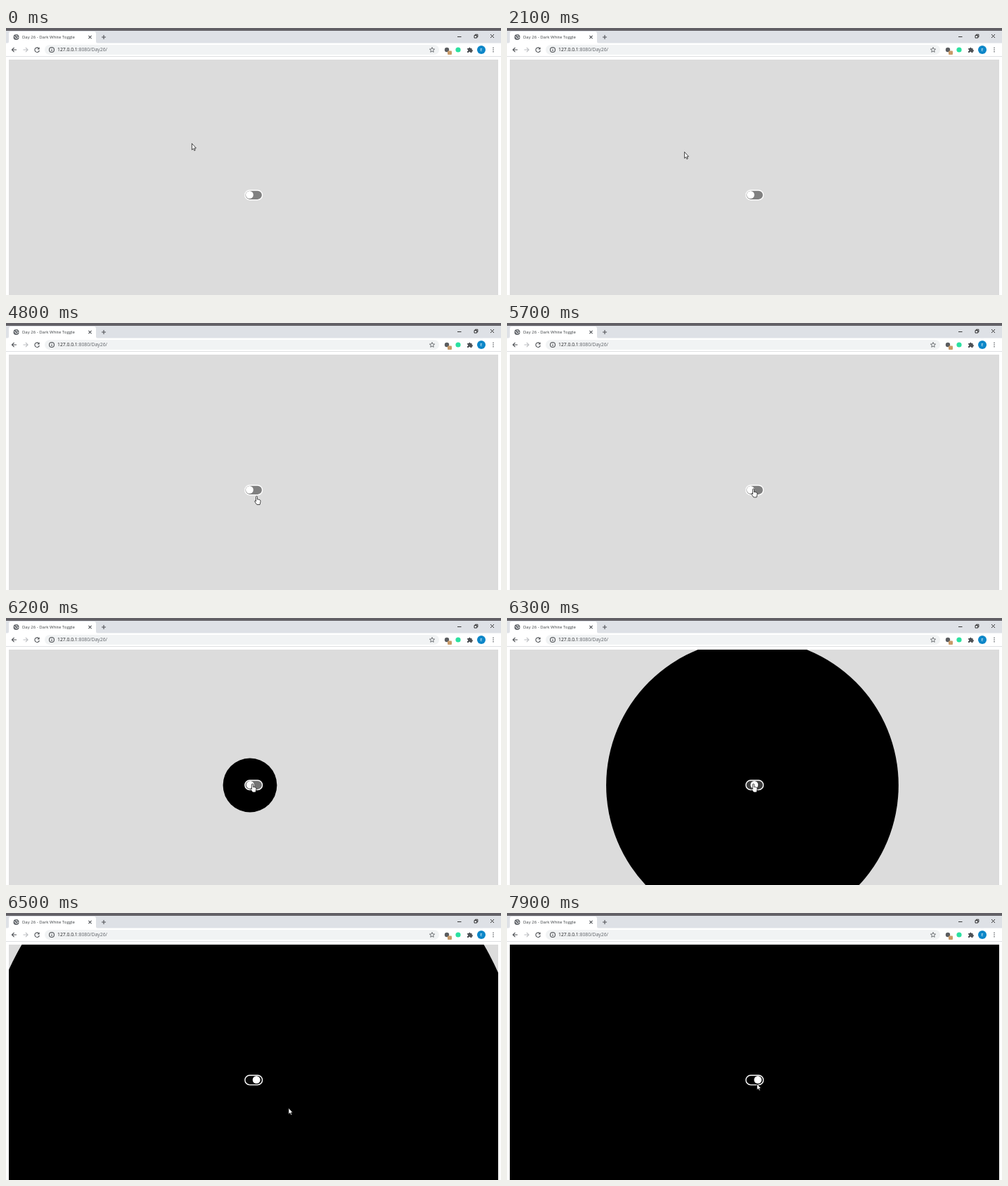
Recreate the animation shown at these times as an HTML page. Size 704 px wide and 380 px high, loop 8000 ms.

```html
<!DOCTYPE html>
<html lang="en">
<head>
<meta charset="utf-8">
<title>Dark mode toggle</title>
<style>
  html, body { margin: 0; width: 100%; height: 100%; overflow: hidden; background: #fff; }
  svg { display: block; width: 704px; height: 380px; font-family: "Open Sans", "Noto Sans", sans-serif; }
  .icon { fill: none; stroke: #505357; stroke-width: 1.1; }
  .thin { stroke-width: .9; stroke: #222; }
</style>
</head>
<body>
<svg viewBox="0 0 704 380">
  <defs><clipPath id="page"><rect x="4" y="45" width="696" height="335"/></clipPath></defs>

  <!-- Tab strip -->
  <rect width="704" height="22" fill="#dee1e6"/>
  <rect width="704" height="4" fill="#626066"/>
  <path d="M1 22Q4 22 4 19V8Q4 5 7 5H125Q128 5 128 8V19Q128 22 131 22Z" fill="#fff"/>
  <circle cx="14.5" cy="13" r="4" fill="#5f6368"/>
  <path d="M11.4 12.2l2 .8.5 2.2M14 9.8l.6 1.5 2.2.4M15.2 15.6l.6-1.8 2-.4" fill="none" stroke="#fff" stroke-width=".9"/>
  <text x="23" y="15.2" font-size="6" fill="#3c4043">Day 26 - Dark White Toggle</text>
  <path class="icon" d="M117.4 10.9l4.2 4.2m0-4.2l-4.2 4.2M136 13h6m-3-3v6"/>
  <path class="icon thin" d="M642 12.5h5.5M666 10.5h3.6v3.6H666ZM667.3 10.5V9.2h3.6v3.6h-1.3M689 9l5 5m0-5l-5 5"/>

  <!-- Toolbar -->
  <rect y="21.5" width="704" height="19" fill="#fff"/>
  <rect y="40" width="704" height="1" fill="#dfe0e2"/>
  <rect x="55" y="24" width="561" height="14" rx="7" fill="#f1f3f4"/>
  <path class="icon" d="M15 31H8.6M11.6 27.8L8.4 31l3.2 3.2"/>
  <path class="icon" style="stroke:#bcbec1" d="M24.5 31h6.4M27.9 27.8l3.2 3.2-3.2 3.2"/>
  <path class="icon" d="M46.7 29A3.3 3.3 0 1 0 47.4 32"/>
  <path d="M47.6 27.2v3.2h-3.2Z" fill="#505357"/>
  <circle class="icon" cx="65" cy="31" r="3.5" stroke-width=".9"/>
  <path class="icon" d="M65 30.5v2.4M65 28.7v.9"/>
  <text x="73" y="33.4" font-size="6.8" fill="#202124">127.0.0.1<tspan fill="#5f6368">:8080/Day26/</tspan></text>
  <path class="icon" style="stroke-width:.8" d="M606 27.5l1 2.4 2.6.2-2 1.7.6 2.5-2.2-1.3-2.2 1.3.6-2.5-2-1.7 2.6-.2Z"/>
  <circle cx="627" cy="31" r="3.2" fill="#5b5d60"/>
  <rect x="628" y="32.5" width="6" height="5.5" rx="1" fill="#c99a68"/>
  <circle cx="643" cy="31" r="3.6" fill="#2be0a0"/>
  <path d="M656 29h2a1.3 1.3 0 0 1 2.6 0h2v2a1.3 1.3 0 0 1 0 2.6v1.4H660.4a1.2 1.2 0 0 0-2.4 0h-2v-2a1.2 1.2 0 0 0 0-2.4Z" fill="#4d5054"/>
  <circle cx="676" cy="31" r="6" fill="#0b86c8"/>
  <text x="676" y="33.2" font-size="6" fill="#fff" text-anchor="middle">E</text>
  <g fill="#505357"><circle cx="693" cy="28.3" r=".8"/><circle cx="693" cy="31" r=".8"/><circle cx="693" cy="33.7" r=".8"/></g>

  <!-- Page -->
  <g clip-path="url(#page)">
    <rect x="4" y="45" width="696" height="335" fill="#dcdcdc"/>
    <circle id="dark" cy="238"/>
  </g>
  <rect id="track" x="339.8" y="231" width="24.8" height="13.6" rx="6.8" stroke="#fff" stroke-width="1.4"/>
  <circle id="knob" cy="237.4" r="5.4" fill="#fff"/>
  <g id="cursor" fill="#fff" stroke="#000" stroke-width=".7" stroke-linejoin="round">
    <path id="arrow" d="M.4 .4V9.4L2.4 7.6 3.8 10.5 5.2 9.9 3.9 7H6.4Z"/>
    <path id="hand" d="M-1 1A1 1 0 0 1 1 1V4.6Q3.6 4.4 4.8 5.4 5.7 6 5.4 8L4.5 12H.3L-2.4 8.2Q-3.2 6.5-2.2 6.4L-1 7.4Z"/>
  </g>
</svg>
<script>
const LOOP = 8000, STEP = 100;
const CLICK = 6150, FADE = 500;
const HOVER = [4800, 6400];

// Pointer path: time, x, y
const path = [
  [0, 264, 164], [500, 252, 176], [2900, 252, 176], [3000, 228, 273],
  [3400, 228, 273], [3800, 273, 278], [3900, 273, 278], [4100, 360, 286],
  [4200, 360, 286], [4700, 357, 250], [5100, 355, 236], [5400, 347, 236],
  [5500, 347, 236], [5600, 352, 236], [5700, 350.5, 236], [6300, 350.5, 236],
  [6500, 401.5, 277], [7000, 401.5, 276], [7900, 355, 242.5]
];

const $ = id => document.getElementById(id);
const set = (id, name, value) => $(id).setAttribute(name, value);
const mix = (a, b, k) => a + (b - a) * k;
const clamp = v => Math.min(1, Math.max(0, v));

// The CSS "ease" curve: cubic-bezier(.25, .1, .25, 1)
function ease(x) {
  const bezier = (a, b, u) => 3 * u * (1 - u) ** 2 * a + 3 * u * u * (1 - u) * b + u ** 3;
  let lo = 0, hi = 1;
  for (let i = 0; i < 24; i++) {
    const mid = (lo + hi) / 2;
    if (bezier(.25, .25, mid) < x) lo = mid; else hi = mid;
  }
  return bezier(.1, 1, hi);
}

function pointer(t) {
  const next = path.findIndex(p => p[0] > t);
  if (next < 0) return path[path.length - 1].slice(1);
  const [t0, x0, y0] = path[next - 1], [t1, x1, y1] = path[next];
  const k = (t - t0) / (t1 - t0);
  return [mix(x0, x1, k), mix(y0, y1, k)];
}

function draw(t) {
  const on = t <= CLICK ? 0 : ease(clamp((t - CLICK) / FADE));
  const grey = Math.round(mix(128, 0, on));
  set("dark", "cx", mix(346.5, 351.3, on));
  set("dark", "r", 405 * on);
  set("track", "fill", `rgb(${grey},${grey},${grey})`);
  set("knob", "cx", mix(346.4, 356.8, on));

  const hovering = t >= HOVER[0] && t < HOVER[1];
  set("arrow", "visibility", hovering ? "hidden" : "visible");
  set("hand", "visibility", hovering ? "visible" : "hidden");
  set("cursor", "transform", `translate(${pointer(t)})`);
}

const start = performance.now();
function tick() {
  const t = (performance.now() - start) % LOOP;
  draw(Math.floor(t / STEP) * STEP);
  requestAnimationFrame(tick);
}
tick();
</script>
</body>
</html>
```
